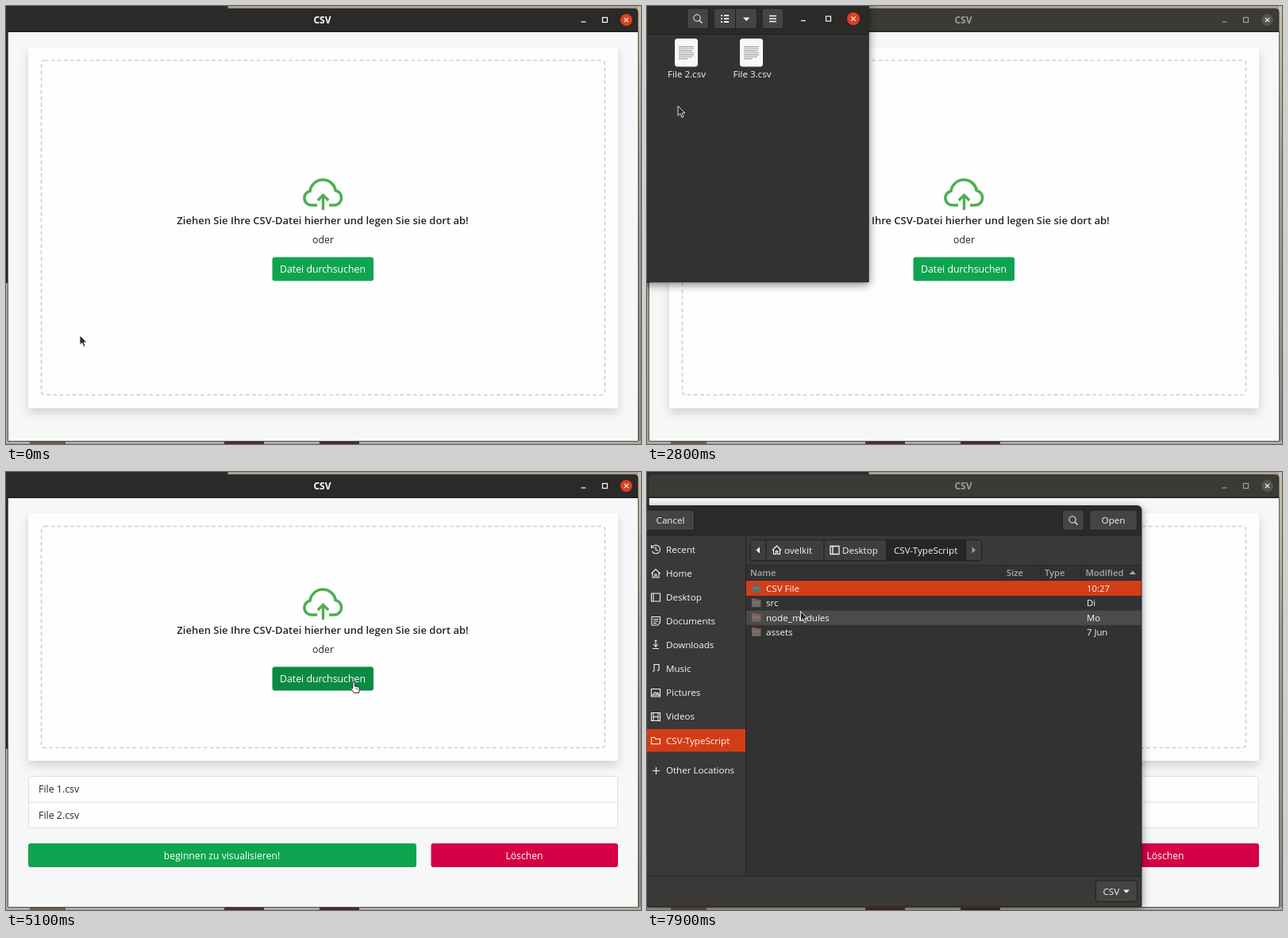
An HTML page that plays this animation: 800 px wide and 552 px high, repeating every 8 s.

```html
<!DOCTYPE html>
<html lang="de">
<head>
<meta charset="utf-8">
<title>CSV</title>
<style>
html, body { margin: 0; width: 100%; height: 100%; overflow: hidden; background: #2b2a28; }
svg { display: block; width: 800px; height: 552px; }
text { font-family: "Open Sans", "Noto Sans", sans-serif; white-space: pre; }
</style>
</head>
<body>
<svg id="stage" viewBox="0 0 800 552" xmlns="http://www.w3.org/2000/svg"></svg>
<script>
const LOOP = 8000, STEP = 100;
const RAISE = 2200, BAND = 3300, SELECT = 3600, RELEASE = 3900, DROP = 4600, DIALOG = 5700, ENTER = 7100;
const ORANGE = '#d23d17', GREEN = '#0fa450', LIGHT = '#f7f6f5', INK = '#212529', BTN = '#454442';

// Pointer tip over time: [ms, x, y]
const pointer = [
  [0, 93, 415], [1300, 3.5, 255], [1600, -30, 220], [2300, -30, 150], [2800, 39, 126],
  [3000, 39, 126], [3300, -45, 101], [3800, 45, 70], [3950, 45, 70], [4550, 410, 225],
  [4700, 410, 225], [5100, 438, 265], [5600, 438, 265], [6300, 250, 150],
  [6700, 183.5, 134], [7100, 183.5, 146], [7900, 193.5, 175.5], [8000, 193.5, 175.5]
];

const MID = 'text-anchor="middle"', SEMI = 'font-weight="600"', MEDIUM = 'font-weight="500"';
const rect = (x, y, w, h, fill, r = 0, more = '') =>
  `<rect x="${x}" y="${y}" width="${w}" height="${h}" rx="${r}" fill="${fill}" ${more}/>`;
const line = (d, stroke, width = 1, more = '') =>
  `<path d="${d}" fill="none" stroke="${stroke}" stroke-width="${width}" ${more}/>`;
const shape = (d, fill) => `<path d="${d}" fill="${fill}"/>`;
const text = (s, x, y, fill, size, more = '') =>
  `<text x="${x}" y="${y}" font-size="${size}" fill="${fill}" ${more}>${s}</text>`;
const label = (s, x, y, more = '', size = 11.6) => text(s, x, y, LIGHT, size, `${MEDIUM} ${more}`);
const group = (id, body) => `<g id="${id}">${body}</g>`;
const button = (x, y, w, h = 26.5) =>
  rect(x + .5, y + .5, w - 1, h - 1, BTN, 3, 'stroke="#201f1e"');

const magnifier = (x, y) =>
  `<circle cx="${x - 1}" cy="${y - 1}" r="4.2" fill="none" stroke="${LIGHT}"/>` +
  line(`M${x + 2} ${y + 2}l3.5 3.5`, LIGHT, 1.2);

function windowButtons(x, y, gap, color, close, r) {
  return line(`M${x - 2 * gap - 3} ${y + 2.5}h6`, color, 1.2) +
    rect(x - gap - 3, y - 3, 6, 6, 'none', 0, `stroke="${color}" stroke-width="1.2"`) +
    `<circle cx="${x}" cy="${y}" r="${r}" fill="${close}"/>` +
    line(`M${x - 2.7} ${y - 2.7}l5.4 5.4m0 -5.4l-5.4 5.4`, LIGHT, 1.2);
}

function desktop() {
  return rect(0, 0, 800, 552, '#aaa093') + rect(796, 0, 4, 552, 'url(#wall)') +
    rect(0, 548, 800, 4, '#b0a99f') + rect(30, 549, 45, 3, '#6b5a50') +
    rect(275, 549, 50, 3, '#4d2f2b') + rect(395, 549, 50, 3, '#452c29') +
    rect(0, 0, 279.5, 349, '#2c2b2a');
}

function titleBar(active) {
  const fg = active ? '#ffffff' : '#a09e9a';
  return shape('M2 33V8q0 -5 5 -5H791.5q5 0 5 5V33z', active ? '#2b2a28' : '#3b3a37') +
    rect(2, 31.5, 794.5, 1, '#1c1b1a') +
    text('CSV', 398.5, 22, fg, 12, `${MID} font-weight="700"`) +
    windowButtons(781.5, 17.5, 27, fg, active ? '#dd4120' : '#56544f', 7.5);
}

function cloud() {
  return line('M392 251H384.5a9 9 0 0 1 -1.5 -17.8A16.3 16.3 0 0 1 415.2 232.5a9.4 9.4 0 0 1 -.7 18.5H407', '#4caf50', 3.6) +
    line('M399.5 257V238.5M392.8 245l6.7 -6.7l6.7 6.7', '#4caf50', 3.3);
}

function app() {
  const list = rect(28.5, 383.5, 742, 65, '#fefefe', 3, 'stroke="#dcdedf"') +
    line('M28 416H771', '#dcdedf') +
    text('File 1.csv', 41, 404, INK, 12.4) + text('File 2.csv', 41, 437, INK, 12.4) +
    rect(28, 468, 489, 30, GREEN, 3) + text('beginnen zu visualisieren!', 272, 487.5, '#fff', 12.2, MID) +
    rect(535.5, 468, 235.5, 30, '#d50045', 3) + text('Löschen', 653, 487.5, '#fff', 12.2, MID);
  const prompt = cloud() +
    text('Ziehen Sie Ihre CSV-Datei hierher und legen Sie sie dort ab!', 399, 275, INK, 13, `${MID} ${SEMI}`) +
    text('oder', 399.5, 299, INK, 12.3, MID) +
    rect(335.5, 316.5, 127.5, 30, GREEN, 3, 'id="browse"') +
    text('Datei durchsuchen', 399, 336, '#fff', 12.3, MID);
  return rect(2, 31, 794.5, 517.5, '#f6f7f7') + group('barOn', titleBar(true)) + group('barOff', titleBar(false)) +
    rect(28, 52, 743, 455, '#fefefe', 3, 'id="card" filter="url(#soft)"') +
    rect(44.5, 68.5, 710, 421.5, 'none', 4, 'id="zone" stroke="#cfcfcf" stroke-width="1.6" stroke-dasharray="4.9 3.2"') +
    group('prompt', prompt) + group('list', list) + line('M2.5 33V548.5H796.5V33', '#4a4743', .9);
}

function fileIcon(x, id) {
  let rows = '';
  for (let i = 0; i < 7; i++) rows += `M${x + 5} ${51.5 + i * 2.5}h${i === 6 ? 11 : i % 3 === 2 ? 17 : 19}`;
  return rect(x, 41, 29, 35.5, '#f8f8f7', 3.5, `id="${id}"`) + line(rows, '#85837f', .9);
}

function fileManager() {
  const head = rect(-10, -10, 289.5, 45, '#2b2a28') + rect(0, 35, 279.5, 1, '#1f1e1d') +
    button(50, 2.5, 28) + magnifier(64, 16) +
    button(83.5, 2.5, 55.5) + line('M111.5 3V29', '#201f1e') +
    line('M93 12h2m2 0h6M93 16h2m2 0h6M93 20h2m2 0h6', LIGHT, 1.8) +
    shape('M121 14.5h8.5l-4.25 4.5z', LIGHT) +
    button(144.5, 2.5, 28) + line('M154 12.5h9m-9 3.5h9m-9 3.5h9', LIGHT, 1.4) +
    windowButtons(260, 16, 31.5, LIGHT, '#dd4120', 8);
  const files = rect(22, 78, 54.5, 16, ORANGE, 2, 'id="label"') +
    fileIcon(35, 'icon') + label('File 2.csv', 50, 90, MID) +
    fileIcon(117, 'other') + label('File 3.csv', 132.5, 90, MID);
  const status = rect(121.5, 329.5, 158, 18.5, '#2c2b2a', 2, 'stroke="#484643"') +
    label('2 items selected  (15,5 kB)', 131, 342.5);
  return rect(-10, -10, 289.5, 358, '#333230', 0, 'filter="url(#deep)"') + head + files + group('status', status) +
    line('M279.2 0V348H0', '#23221f', .6) +
    rect(-50, 70, 95, 31, '#7d8888', 0, 'id="band" fill-opacity=".28" stroke="#8a8f8e"');
}

const houseIcon = 'M5.5 128l5.5 -5.5l5.5 5.5M7 127v6h3v-4h2v4h3v-6';
const places = [
  ['Recent', 'M6.5 95a5.3 5.3 0 1 1 0 5M5.5 92v3.3h3.3M11 94v4l3 1'],
  ['Home', houseIcon],
  ['Desktop', 'M5.5 153h11v10h-11zM8 153v10'],
  ['Documents', 'M6 182.5h10.5v7l-3 3.5H6zM8 185.5h6.5m-6.5 2.5h6.5m-6.5 2.5h4'],
  ['Downloads', 'M11 212v8m-3 -3l3 3.3l3 -3.3M9.5 212.5h3M7 222.5h8'],
  ['Music', 'M9 251v-8.5h6V250M7 251h2m4 -.8h2'],
  ['Pictures', 'M5.5 273.5h11v9.5h-11zM7 281l3 -3.5l2 2l1.5 -1.5l2 3z'],
  ['Videos', 'M5.5 303.5h11v10h-11zM8 303.5v10m6 -10v10M8 308.5h6'],
  ['CSV-TypeScript', 'M5.5 342.8v-8.3h4l1.5 2h5.5v6.3z']
];
const inDesktop = [
  ['CSV-TypeScript', '10:19'], ['wichtig csv', '4 Jun'], ['visualising-csv', '1 Jun'],
  ['9 (Moth King)', '26 Mai'], ['electron-tutorial-app', '19 Mai'], ['test-electron', '13 Mai'],
  ['electron-quick-start', '13 Mai'], ['electron-api-demos', '13 Mai'], ['jsonding', '29 Apr'],
  ['javatutor2.0', '20 Apr'], ['Olvra Electron Shaping Multi System Desktop Tools…', '18 Dez 2016']
];
const inProject = [['CSV File', '10:27'], ['src', 'Di'], ['node_modules', 'Mo'], ['assets', '7 Jun']];
const ROW = 18.3, PLACE = 30.1;

const fileRows = rows => rows.map(([name, date], i) => {
  const y = 151 + i * ROW;
  return shape(`M132 ${y - 10}h4.5l1 1.5h6v9.5h-11.5z`, '#6c6a67') +
    line(`M132 ${y - 9.3}h4.5l1 1.3h6`, '#a9443c', 1.2) +
    line(`M134 ${y - 4.5}h7.5`, '#8f8c88', .8) +
    label(name, 150, y) + label(date, 554, y, '', 11.3);
}).join('');

const sideMark = i => rect(0, Math.round(83.5 + i * PLACE), 124, 28.5, ORANGE);

function pathBar(deep) {
  const end = deep ? 401.5 : 301.5, from = deep ? 301 : 223;
  return rect(130, 85.5, end + 20 - 130, 26, '#3f3e3c', 3, 'stroke="#201f1e"') +
    rect(from, 86, end - from, 25, '#272625') +
    line(`M150 86v25M223 86v25M301.5 86v25M${end} 86v25`, '#201f1e') +
    shape('M142 94.5v8l-4.5 -4z', LIGHT) + shape(`M${end + 8} 94.5v8l4.5 -4z`, '#a19f9b') +
    line(houseIcon, LIGHT, 1.2, 'transform="translate(152.5 -29.5)"') +
    label('ovelkit', 173, 102.5) +
    line('M231 93.5h11v10h-11zM234 93.5v10', LIGHT, 1.3) + label('Desktop', 246, 102.5) +
    (deep ? label('CSV-TypeScript', 311, 102.5) : '');
}

function dialog() {
  const frame = 'M-10 42.5H617q6 0 6 6V547.5H-10z';
  const side = places.map(([name, icon], i) =>
    line(icon, LIGHT, 1.1) + label(name, 24, 101.7 + i * PLACE)).join('');
  const head = (s, x) => text(s, x, 131, '#a9a7a3', 11.2, SEMI);
  return `<path d="${frame}" fill="#323130" filter="url(#deep)"/>` +
    shape('M0 42.5H617q6 0 6 6V80H0z', '#2b2a28') + rect(0, 79.5, 623, 1, '#1f1e1d') +
    rect(0, 80.5, 124, 430, '#3a3937') + rect(0, 510, 623, 37.5, '#3a3937') +
    line('M124.5 80V510M0 509.5H623', '#252422') +
    button(-5, 47.5, 65) + label('Cancel', 29.5, 65, MID) +
    button(523, 47.5, 28) + magnifier(537, 61) +
    button(557, 47.5, 61) + label('Open', 587.5, 65, MID) +
    rect(125, 80.5, 498, 36.5, '#3a3937') + line('M125 117.5H623', '#292826') +
    group('sideA', sideMark(2)) + group('sideB', sideMark(8)) + side +
    line('M7 376.5h9m-4.5 -4.5v9', LIGHT, 1.1) + label('Other Locations', 24, 380) +
    head('Name', 130) + head('Size', 453) + head('Type', 501) + head('Modified', 552.5) +
    line('M448.5 118v18M495.5 118v18M547.5 118v18M125 136.5H623', '#292826') +
    shape('M607.5 129h8.5l-4.25 -4.5z', '#a9a7a3') +
    rect(125, 137, 498, 19, ORANGE) + rect(125, 174.5, 498, ROW, '#4c4b49', 0, 'id="hover"') +
    group('levelA', pathBar(false) + fileRows(inDesktop)) +
    group('levelB', pathBar(true) + fileRows(inProject)) +
    button(565, 514.5, 53, 27.5) + label('CSV', 574.5, 532.5) + shape('M600 526.5h8l-4 4.2z', LIGHT) +
    line(frame, '#1f1e1d', .8);
}

const arrow = '<path d="M0 0V12.2l2.9 -2.6l2 4.8l2.2 -.9l-2 -4.6h3.7z" fill="#2a2a2a" stroke="#f4f4f4" stroke-width=".9"/>';
const hand = '<path d="M-1.2 1q0 -1.4 1.3 -1.4t1.3 1.4v4l5.2 1.2q1.2 .4 1 1.8l-.9 5.3h-6.2l-3.9 -4.8q-.4 -1.3 1 -1.3l1.2 .9z" fill="#fff" stroke="#222" stroke-width="1"/><path d="M3.2 7.2v2M5.2 7.6v2" stroke="#222" stroke-width=".7"/>';

const shadow = (id, dy, blur, alpha) =>
  `<filter id="${id}" x="-10%" y="-10%" width="120%" height="125%"><feDropShadow dx="0" dy="${dy}" stdDeviation="${blur}" flood-opacity="${alpha}"/></filter>`;

const stage = document.getElementById('stage');
stage.innerHTML = `<defs>${shadow('soft', 6, 6, .15)}${shadow('deep', 3, 6, .5)}
  <linearGradient id="wall" x2="0" y2="1"><stop stop-color="#cbbfa9"/><stop offset=".35" stop-color="#a59a8c"/>
  <stop offset="1" stop-color="#8e8479"/></linearGradient></defs>` +
  desktop() + app() + group('dialog', dialog()) + group('files', fileManager()) +
  group('cursor', group('arrow', arrow) + group('hand', hand));

const $ = id => document.getElementById(id);
const show = (id, on) => $(id).setAttribute('display', on ? 'inline' : 'none');
const set = (id, attrs) => { for (const k in attrs) $(id).setAttribute(k, attrs[k]); };

function pointerAt(t) {
  const i = pointer.findIndex(p => p[0] > t);
  const [t0, x0, y0] = pointer[i - 1], [t1, x1, y1] = pointer[i];
  const u = (t - t0) / (t1 - t0), k = u * u * (3 - 2 * u);
  return [x0 + (x1 - x0) * k, y0 + (y1 - y0) * k];
}

function render(t) {
  const [x, y] = pointerAt(t);
  const loaded = t >= DROP, open = t >= DIALOG, deep = t >= ENTER;
  const managing = t >= RAISE && t < DROP, selected = t >= SELECT && managing;
  const active = !managing && !open;

  show('barOn', active);
  show('barOff', !active);
  set('card', { height: loaded ? 312 : 455 });
  set('zone', { height: loaded ? 279 : 421.5 });
  set('prompt', { transform: `translate(0 ${loaded ? -71 : 0})` });
  show('list', loaded);

  show('files', managing);
  show('label', selected);
  show('status', selected);
  set('icon', { fill: selected ? '#a3a2a0' : '#f8f8f7' });
  show('band', t >= BAND && t < RELEASE);
  set('band', { width: Math.max(0, x + 50), y: y + .5, height: Math.max(0, 101 - y) });

  show('dialog', open);
  for (const id of ['sideA', 'levelA']) show(id, !deep);
  for (const id of ['sideB', 'levelB']) show(id, deep);
  const row = Math.floor((y - 137.5) / ROW);
  show('hover', x > 125 && row > 0 && row < (deep ? inProject : inDesktop).length);
  set('hover', { y: 138 + row * ROW });

  const over = loaded && !open && x > 336 && x < 463 && y > 245 && y < 275;
  set('browse', { fill: over ? '#0b8a43' : GREEN });
  show('hand', over);
  show('arrow', !over);
  set('cursor', { transform: `translate(${x} ${y})` });
}

const start = performance.now();
function tick() {
  const t = (performance.now() - start) % LOOP;
  render(Math.floor(t / STEP) * STEP);
  requestAnimationFrame(tick);
}
render(0);
requestAnimationFrame(tick);
</script>
</body>
</html>
```
